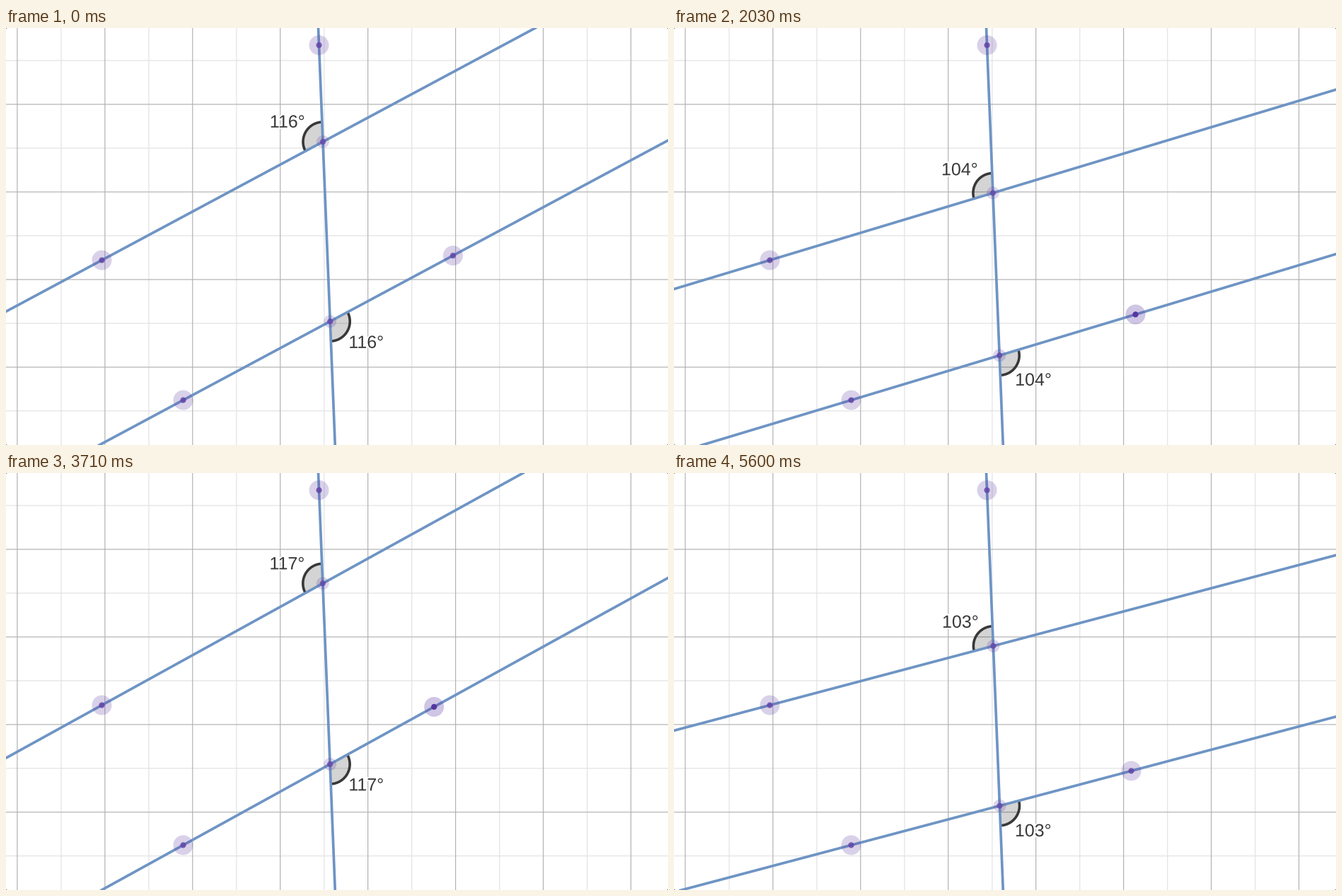
Recreate the animation shown at these times as a matplotlib script. Size 936x590 px, loop 5810 ms.

```python
import numpy as np
import matplotlib.pyplot as plt
import matplotlib.patheffects as pe
from matplotlib.animation import FuncAnimation
from matplotlib.patches import Circle, PathPatch, Polygon
from matplotlib.textpath import TextPath
from matplotlib.transforms import Affine2D

W, H, DPI = 936, 590, 100
STEP, FRAMES = 70, 83
PX = 72 / DPI  # one pixel in points

BLUE, PURPLE, VIVID = "#6e94c4", "#6042a6", "#5636a0"
INK = "#383838"
ANCHOR_TOP = np.array([135.5, 328.5])
ANCHOR_LOW = np.array([250.5, 526.5])
CROSS_X, CROSS_LEAN = 441.55, 0.0402  # transversal: x = CROSS_X + CROSS_LEAN * y
ARC_R, LABEL_R = 28, 58.3

# Drag path of the right-hand handle: time in ms, x, y
DRAG = np.array([
    (0, 632, 322), (980, 632, 322),
    (1470, 646, 364.5), (2030, 652.5, 405.3),
    (2310, 655, 414), (2660, 655, 414), (2730, 655, 412.5),
    (3220, 629.5, 360.5), (3850, 603, 328.5), (4200, 603, 328.5),
    (4480, 609.5, 342.5), (5320, 646.5, 421.5), (5810, 646.5, 421.5),
])
HOVER_START, HOVER_FULL, HOVER_END = 210, 420, 5600

plt.rcParams["font.family"] = "Liberation Sans"


def monotone(t, ts, vs):
    """Monotone cubic interpolation that rests on plateaus."""
    h, d = np.diff(ts), np.diff(vs) / np.diff(ts)
    a, b = d[:-1], d[1:]
    inner = np.where(a * b > 0, 2 * a * b / np.where(a + b == 0, 1, a + b), 0)
    m = np.concatenate([[0], inner, [0]])
    i = min(np.searchsorted(ts, t, side="right") - 1, len(h) - 1)
    u = (t - ts[i]) / h[i]
    return ((1 + 2 * u) * (1 - u) ** 2 * vs[i] + u * (1 - u) ** 2 * h[i] * m[i]
            + u * u * (3 - 2 * u) * vs[i + 1] + u * u * (u - 1) * h[i] * m[i + 1])


def polar(center, radius, angle):
    return np.column_stack([center[0] + radius * np.cos(angle),
                            center[1] + radius * np.sin(angle)])


def crossing(anchor, slope):
    """Where the line through anchor meets the transversal."""
    y = ((anchor[1] + slope * (CROSS_X - anchor[0]))
         / (1 - slope * CROSS_LEAN))
    return np.array([CROSS_X + CROSS_LEAN * y, y])


fig = plt.figure(figsize=(W / DPI, H / DPI), dpi=DPI, facecolor="white")
ax = fig.add_axes([0, 0, 1, 1])
ax.set(xlim=(0, W), ylim=(H, 0))
ax.axis("off")


def stroke(xs, ys, color, width, z):
    return ax.plot(xs, ys, color=color, lw=width * PX, zorder=z,
                   solid_capstyle="butt")[0]


class Handle:
    def __init__(self, pos, radius, alpha, dot_alpha=0.82):
        self.halo = Circle(pos, radius, fc=PURPLE, lw=0, alpha=alpha, zorder=5)
        self.dot = Circle(pos, 4.1, fc=PURPLE, lw=0, alpha=dot_alpha, zorder=6)
        ax.add_patch(self.halo)
        ax.add_patch(self.dot)

    def move(self, pos):
        self.halo.center = self.dot.center = pos

    def glow(self, amount):
        self.halo.set_alpha(0.24 + 0.06 * amount)
        self.dot.set_alpha(0.82 + 0.18 * amount)
        self.dot.set_facecolor(VIVID if amount else PURPLE)


class AngleMark:
    def __init__(self):
        self.fill = Polygon(np.zeros((3, 2)), fc="black", alpha=0.17, lw=0,
                            zorder=2)
        ax.add_patch(self.fill)
        self.arc = stroke([], [], INK, 3.6, 3)
        self.label = PathPatch(TextPath((0, 0), "0", size=25), fc=INK, lw=0,
                               zorder=8)
        self.label.set_path_effects([
            pe.Stroke(linewidth=4 * PX, foreground="white"), pe.Normal()])
        ax.add_patch(self.label)

    def update(self, vertex, start, end):
        rim = polar(vertex, ARC_R, np.linspace(start, end, 50))
        self.fill.set_xy(np.vstack([vertex, rim]))
        self.arc.set_data(rim[:, 0], rim[:, 1])
        text = f"{np.degrees(end - start):.0f}°"
        path = TextPath((0, 0), text, size=25)
        box = path.get_extents()
        x, y = polar(vertex, LABEL_R, np.array([(start + end) / 2]))[0]
        place = Affine2D().translate(-(box.x0 + box.x1) / 2, -8.7)
        place.scale(1, -1).translate(x + 0.6, y)
        self.label.set_path(place.transform_path(path))


def grid(offset, pitch, color, width, z):
    for x in np.arange(offset[0], W, pitch):
        stroke([x, x], [0, H], color, width, z).set_snap(False)
    for y in np.arange(offset[1], H, pitch):
        stroke([0, W], [y, y], color, width, z).set_snap(False)


grid((78, 46), 123.95, "#e2e2e2", 1.2, 0)
grid((15.9, 108), 123.95, "#b2b2b2", 1.2, 1)
for corner in ((0, 0), (W, 0), (0, H), (W, H)):
    ax.add_patch(Circle(corner, 1.3, fc="#777777", lw=0, zorder=9))

stroke([CROSS_X, CROSS_X + CROSS_LEAN * H], [0, H], BLUE, 3.7, 4)
parallels = [stroke([], [], BLUE, 3.7, 4) for _ in range(2)]
marks = [AngleMark() for _ in range(2)]
joints = [Handle((0, 0), 9, 0.22, 0.75) for _ in range(2)]
for spot in (ANCHOR_TOP, ANCHOR_LOW, (CROSS_X + CROSS_LEAN * 24.3, 24.3)):
    Handle(spot, 14, 0.24)
dragged = Handle((0, 0), 14, 0.24)


def draw(frame):
    t = frame * STEP
    x, y = (monotone(t, DRAG[:, 0], DRAG[:, k]) for k in (1, 2))
    slope = (y - ANCHOR_LOW[1]) / (x - ANCHOR_LOW[0])
    dragged.move((x, y))
    hover = np.clip((t - HOVER_START) / (HOVER_FULL - HOVER_START), 0, 1)
    dragged.glow(hover if t < HOVER_END else 0)

    start = np.pi + np.arctan(slope)
    end = 1.5 * np.pi - np.arctan(CROSS_LEAN)
    for k, anchor in enumerate((ANCHOR_TOP, ANCHOR_LOW)):
        xs = np.array([-10, W + 10])
        parallels[k].set_data(xs, anchor[1] + slope * (xs - anchor[0]))
        vertex = crossing(anchor, slope)
        joints[k].move(vertex)
        marks[k].update(vertex, start + k * np.pi, end + k * np.pi)
    return []


anim = FuncAnimation(fig, draw, frames=FRAMES, interval=STEP, repeat=True,
                     repeat_delay=0, init_func=lambda: draw(0), blit=False)
plt.show()
```
